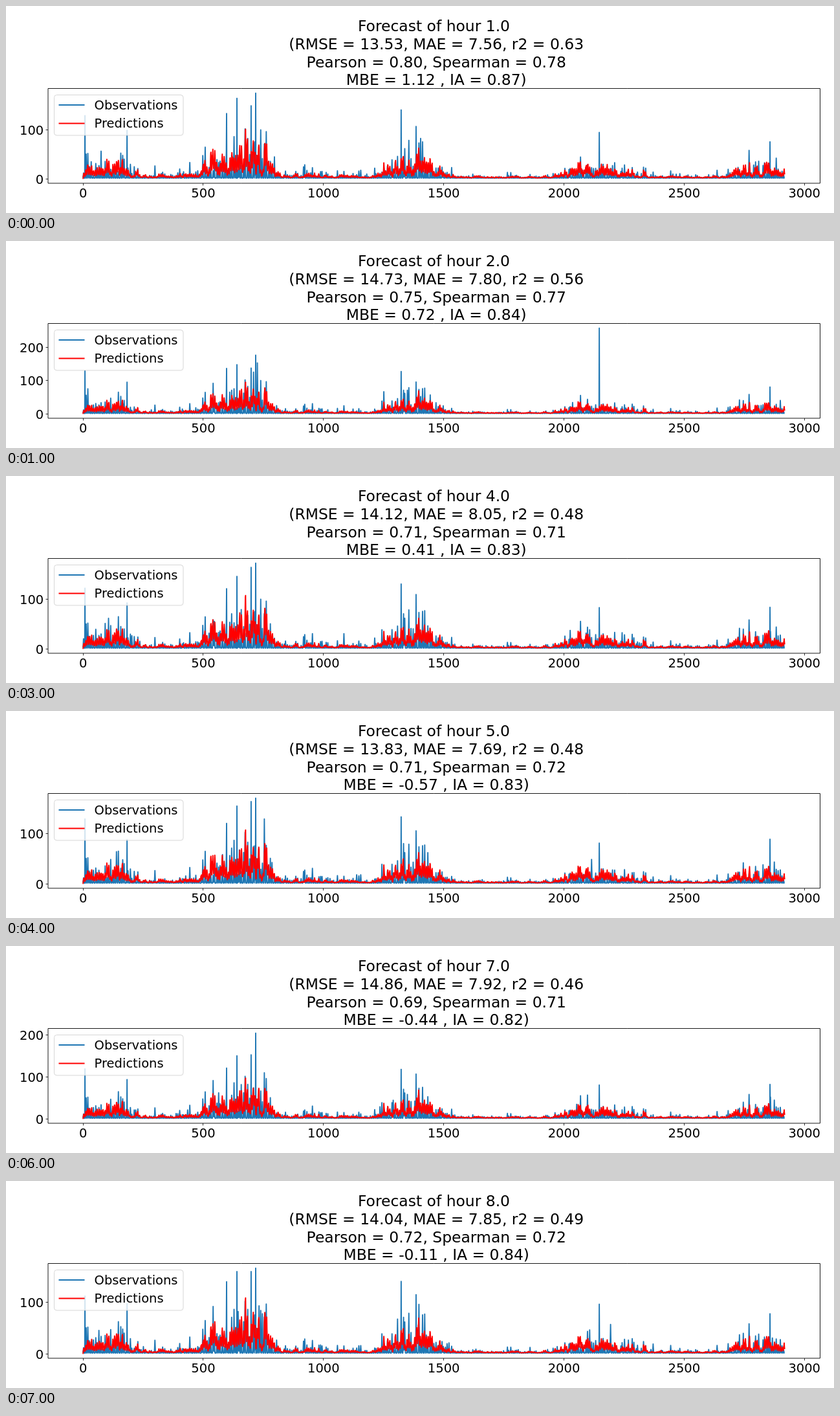
Write an HTML page with a canvas that moves like this. It is 1280 px wide and 320 px high and loops after 8 s.

```html
<!DOCTYPE html>
<html lang="en">
<head>
<meta charset="utf-8">
<title>Forecast by hour</title>
<style>
html, body { margin: 0; width: 100%; height: 100%; overflow: hidden; background: #fff; }
canvas { display: block; }
</style>
</head>
<body>
<canvas id="chart" width="1280" height="320"></canvas>
<script>
const ctx = document.getElementById('chart').getContext('2d');
const HOLD = 1000, COUNT = 2919;
const LEFT = 65, RIGHT = 1258.5, TOP = 127.5, BOTTOM = 274;
const ORIGIN = 119.1, STEP = 0.3717, ZERO = 267.4;
const BLUE = '#1f77b4', RED = '#ff0000';
const FONT = '"DejaVu Sans", sans-serif';

// The highest observation of each hour is `max`, found at stage position `peak`.
const hours = [
  { max: 175, peak: 386, errors: 'RMSE = 13.53, MAE = 7.56, r2 = 0.63', ranks: ['0.80', '0.78'], bias: 'MBE = 1.12 , IA = 0.87' },
  { max: 257, peak: 917, errors: 'RMSE = 14.73, MAE = 7.80, r2 = 0.56', ranks: ['0.75', '0.77'], bias: 'MBE = 0.72 , IA = 0.84' },
  { max: 215, peak: 917, errors: 'RMSE = 15.19, MAE = 8.84, r2 = 0.48', ranks: ['0.70', '0.67'], bias: 'MBE = 1.53 , IA = 0.82', haze: true },
  { max: 173, peak: 386, errors: 'RMSE = 14.12, MAE = 8.05, r2 = 0.48', ranks: ['0.71', '0.71'], bias: 'MBE = 0.41 , IA = 0.83' },
  { max: 170, peak: 386, errors: 'RMSE = 13.83, MAE = 7.69, r2 = 0.48', ranks: ['0.71', '0.72'], bias: 'MBE = -0.57 , IA = 0.83' },
  { max: 310, peak: 664.5, errors: 'RMSE = 14.91, MAE = 7.77, r2 = 0.45', ranks: ['0.68', '0.72'], bias: 'MBE = -0.65 , IA = 0.81' },
  { max: 205, peak: 386, errors: 'RMSE = 14.86, MAE = 7.92, r2 = 0.46', ranks: ['0.69', '0.71'], bias: 'MBE = -0.44 , IA = 0.82' },
  { max: 166, peak: 386, errors: 'RMSE = 14.04, MAE = 7.85, r2 = 0.49', ranks: ['0.72', '0.72'], bias: 'MBE = -0.11 , IA = 0.84' }
];

// Busy seasons as [centre, height, half width], and the peaks all hours share.
const seasons = [[124, 70, 6], [165, 34, 36], [240, 5, 50], [355, 58, 56], [387, 46, 22], [490, 5, 75],
  [615, 52, 38], [660, 25, 25], [902, 28, 45], [960, 15, 36], [1165, 24, 42], [1190, 14, 14]];
const landmarks = [[122, 118], [187, 95], [341, 128], [357, 157], [379, 150], [386, 165],
  [611, 130], [634, 105], [917, 90], [1181, 82]];

const random = (n, seed) => {
  const v = Math.sin(n * 12.9898 + seed * 78.233) * 43758.5453;
  return v - Math.floor(v);
};
const noise = (t, seed) => {
  const k = Math.floor(t), a = random(k, seed), b = random(k + 1, seed);
  return a + (b - a) * (t - k);
};
const plateau = (x, mid, half) => Math.exp(-(((x - mid) / half) ** 4));
const level = x => seasons.reduce((sum, [mid, height, half]) => sum + height * plateau(x, mid, half), 4);
const toX = i => ORIGIN + i * STEP;
const toIndex = x => Math.round((x - ORIGIN) / STEP);

// Eight samples a day: a daily swing inside slower bursts, scaled by the season.
function buildSeries(hour, n) {
  const observed = [], predicted = [];
  for (let i = 0; i < COUNT; i++) {
    const day = i >> 3, phase = i % 8, env = level(toX(i));
    const burst = noise(i / 9, 2) ** 1.4;
    const wave = Math.sin(Math.PI * (phase + 0.5) / 8) ** 2;
    const drift = 0.92 + 0.16 * random(day, 40 + n);
    predicted.push(2 + env * (0.12 + 1.05 * burst) * (0.3 + 0.7 * wave) * (0.8 + 0.3 * random(i, 3)) * drift);

    const gust = random(day, random(day, 10 + n) < 0.3 ? 20 + n : 1);
    const crest = env * (0.25 + 1.35 * gust ** 2) * (0.55 + 0.6 * burst)
      + Math.min(24, env * 2.5) * random(day, 7) ** 5 * (0.6 + 0.4 * gust);
    const pulse = Math.exp(-(((phase - 2 - Math.floor(4 * random(day, 4))) / 1.3) ** 2));
    observed.push(1.8 + crest * pulse);

    if (hour.haze && i > 2290 && i < 2672 && i % 2) {
      observed[i] = Math.max(observed[i], 12 + 10 * Math.min(1, (i - 2290) / 300) + 7 * random(i, 6));
    }
  }
  for (const [x, value] of landmarks) {
    observed[toIndex(x)] = Math.min(value * (0.9 + 0.2 * random(x, n)), hour.max * 0.96);
  }
  observed[toIndex(hour.peak)] = hour.max;
  predicted[0] = 0;
  return { observed, predicted };
}

const series = hours.map(buildSeries);

function text(str, x, y, size, align) {
  ctx.font = size + 'px ' + FONT;
  ctx.textAlign = align;
  ctx.fillStyle = '#000';
  ctx.fillText(str, x, y);
}

function line(points, color, width) {
  ctx.beginPath();
  for (const [x, y] of points) ctx.lineTo(x, y);
  ctx.strokeStyle = color;
  ctx.lineWidth = width;
  ctx.stroke();
}

function drawTitle({ errors, ranks, bias }, n) {
  const rows = [
    `Forecast of hour ${n + 1}.0`,
    ` (${errors}`,
    ` Pearson = ${ranks[0]}, Spearman = ${ranks[1]}`,
    ` ${bias})`
  ];
  rows.forEach((row, k) => text(row, 661.5, Math.round(39.4 + k * 27.6), 23.45, 'center'));
}

function drawAxes(max, scale) {
  for (let v = 0; v <= 3000; v += 500) {
    const x = Math.floor(toX(v)) + 0.5;
    line([[x, BOTTOM], [x, BOTTOM + 3.5]], '#000', 0.8);
    text(String(v), toX(v), 295.5, 19.5, 'center');
  }
  const tickStep = max > 300 ? 200 : 100;
  for (let v = 0; v <= max; v += tickStep) {
    const y = Math.floor(ZERO - v * scale) + 0.5;
    line([[LEFT - 3.5, y], [LEFT, y]], '#000', 0.8);
    text(String(v), 58.2, y + 7, 19.5, 'right');
  }
  ctx.lineWidth = 0.9;
  ctx.strokeStyle = '#000';
  ctx.strokeRect(LEFT, TOP, RIGHT - LEFT, BOTTOM - TOP);
}

function drawLegend() {
  ctx.beginPath();
  ctx.roundRect(74.5, 137.5, 199.5, 62.5, 4);
  ctx.fillStyle = 'rgba(255,255,255,0.8)';
  ctx.fill();
  ctx.strokeStyle = 'rgba(204,204,204,0.8)';
  ctx.lineWidth = 1;
  ctx.stroke();
  [['Observations', BLUE, 153], ['Predictions', RED, 181.5]].forEach(([label, color, y]) => {
    line([[81.5, y], [121.5, y]], color, 2);
    text(label, 136.6, Math.round(y + 6.8), 19.5, 'left');
  });
}

function draw(n) {
  const hour = hours[n], scale = 132.7 / hour.max;
  const plot = (values, color) =>
    line(values.map((v, i) => [toX(i), ZERO - v * scale]), color, 1.9);
  ctx.fillStyle = '#fff';
  ctx.fillRect(0, 0, 1280, 320);
  ctx.lineJoin = 'round';
  plot(series[n].observed, BLUE);
  plot(series[n].predicted, RED);
  drawAxes(hour.max, scale);
  drawLegend();
  drawTitle(hour, n);
}

const start = performance.now();
let shown = -1;
function tick() {
  const n = Math.floor((performance.now() - start) / HOLD) % hours.length;
  if (n !== shown) draw(shown = n);
  requestAnimationFrame(tick);
}
tick();
</script>
</body>
</html>
```
